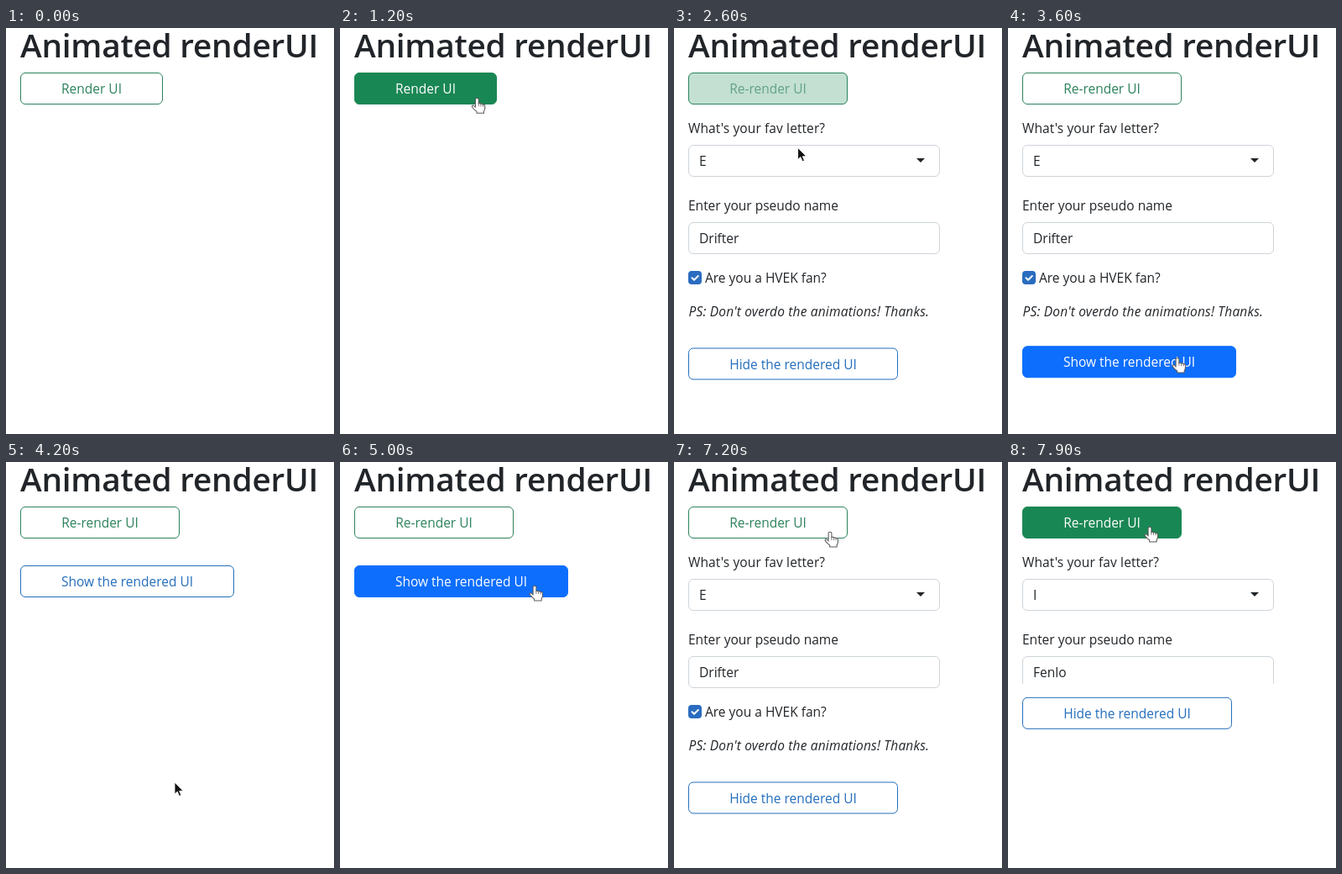
These frames come from a looping animation (391x483 px, 8000 ms). An HTML page:

```html
<!DOCTYPE html>
<html lang="en">
<head>
<meta charset="utf-8">
<title>Animated form</title>
<style>
  html, body { margin: 0; width: 100%; height: 100%; overflow: hidden; background: #fff; }
  svg { display: block; width: 100vw; height: 100vh; }
  text { font: 15.5px "Open Sans", "Noto Sans", sans-serif; fill: #212529; white-space: pre; }
  .title { font-size: 38.8px; font-weight: 600; letter-spacing: -.25px; }
  .label { letter-spacing: .11px; }
  .note { font-style: italic; letter-spacing: .2px; }
  .button text { text-anchor: middle; }
  .field { fill: #fff; stroke: #ced4da; }
</style>
</head>
<body>
<svg viewBox="0 0 391 483">
  <defs>
    <clipPath id="clip"><rect id="window" y="107" width="391" height="0"/></clipPath>
  </defs>

  <text class="title" x="17" y="35">Animated renderUI</text>

  <g id="render" class="button">
    <rect x="17.5" y="53.5" height="37" rx="5.5"/>
    <text y="78"></text>
  </g>

  <g id="form" clip-path="url(#clip)">
    <text class="label" x="17" y="125">What's your fav letter?</text>
    <rect class="field" x="17.5" y="139.5" width="299" height="37" rx="5.5"/>
    <text id="letter" x="30" y="164"></text>
    <path d="M289 155h10l-5 5z" fill="#212529"/>

    <text x="17" y="217">Enter your pseudo name</text>
    <rect class="field" x="17.5" y="231.5" width="299" height="37" rx="5.5"/>
    <text id="name" x="30" y="256"></text>

    <rect x="17" y="289" width="16" height="16" rx="4" fill="#2a6cbf"/>
    <path d="M21.5 297.3l2.5 2.5 4.8-4.8" fill="none" stroke="#fff" stroke-width="2"
      stroke-linecap="round" stroke-linejoin="round"/>
    <text x="37" y="303">Are you a HVEK fan?</text>
    <text class="note" x="17.5" y="343">PS: Don't overdo the animations! Thanks.</text>
  </g>

  <g id="toggle" class="button">
    <rect x="17.5" y=".5" height="37" rx="5.5"/>
    <text y="25"></text>
  </g>

  <g id="cursor">
    <path id="arrow" d="M0 0V14.2L3.3 11.2 5.5 16.4 7.9 15.4 5.7 10.4H10.2Z"
      fill="#111" stroke="#fff" stroke-width=".9"/>
    <g id="hand" transform="scale(1.06 1)" stroke="#5a5a5a" stroke-linejoin="round" stroke-linecap="round">
      <path d="M-1.8 11V2a1.8 1.8 0 0 1 3.6 0V6.5q1.3-.9 2.5.5 1.3-.7 2.4.6 2.2-.3 2.2 2V12
        q0 2-1.2 3.6V18H-.3V16Q-2.6 14.4-5 11.4-6.4 9.2-4.6 8.7-3.4 8.6-1.8 11Z" fill="#fff"/>
      <path d="M1.8 6.5V9.5M4.3 7V9.7M6.7 7.6V10" fill="none" stroke-width=".8"/>
    </g>
  </g>
</svg>

<script>
const LOOP = 8000, STEP = 100;
const FULL = 257.5, SLIDE = 600, FADE = 150;
const FORM_TOP = 107, GAP = 16;

const RENDERED = 1600, HIDE_CLICK = 3100, SHOW_CLICK = 5400, RERENDERED = 7558;
const slides = [
  { at: 1697, open: true },
  { at: 3564, open: false },
  { at: 5330, open: true },
  { at: RERENDERED, open: true }
];

// time, x, y of the pointer's hot spot
const path = [
  [300, 357, 443], [700, 262, 236], [1100, 180, 87], [1400, 130, 76],
  [2400, 130, 76], [2500, 134, 84], [2750, 168, 230], [3000, 201, 388], [3100, 202, 392],
  [3800, 202, 392], [4000, 201, 381], [4200, 201, 381], [4400, 215, 343],
  [4850, 229, 156], [5000, 232, 147], [6000, 232, 147], [6350, 225, 392],
  [6600, 225, 392], [6900, 247, 149], [7200, 186, 83], [7300, 169, 77]
];
const greenHover = [[1040, 2500], [7200, 8200]];
const blueHover = [[2900, 3800], [4850, 5400], [6330, 6650]];
const handTimes = [[1040, 2520], [2900, 3900], [4850, 6050], [6330, 6680], [6880, LOOP]];

const GREEN_LINE = [45, 130, 92], GREEN = [25, 135, 84];
const BLUE_LINE = [36, 110, 188], BLUE = [13, 110, 253];
const WHITE = [255, 255, 255];

const $ = id => document.getElementById(id);
const clamp = v => Math.min(1, Math.max(0, v));
const smooth = v => v * v * (3 - 2 * v);
const swing = v => .5 - Math.cos(v * Math.PI) / 2;
const mix = (a, b, k) => `rgb(${a.map((v, i) => Math.round(v + (b[i] - v) * k))})`;
const show = (el, on) => el.setAttribute("visibility", on ? "inherit" : "hidden");
const within = (spans, t) => spans.some(([a, b]) => t >= a && t < b);

function hoverAmount(spans, t) {
  return Math.max(...spans.map(([a, b]) =>
    smooth(clamp((t - a) / FADE)) * (1 - smooth(clamp((t - b) / FADE)))));
}

function formHeight(t) {
  const slide = slides.filter(s => s.at <= t).pop();
  if (!slide) return 0;
  const k = swing(clamp((t - slide.at) / SLIDE));
  return FULL * (slide.open ? k : 1 - k);
}

function pointerAt(t) {
  const next = path.findIndex(p => p[0] > t);
  if (next < 0) return path[path.length - 1].slice(1);
  const [t0, x0, y0] = path[Math.max(0, next - 1)];
  const [t1, x1, y1] = path[next];
  const k = clamp((t - t0) / (t1 - t0));
  return [x0 + (x1 - x0) * k, y0 + (y1 - y0) * k];
}

function setButton(el, label, width, line, fill, hover) {
  const [box, text] = el.children;
  box.setAttribute("width", width - 1);
  box.setAttribute("fill", mix(WHITE, fill, hover));
  box.setAttribute("stroke", mix(line, fill, hover));
  text.setAttribute("x", 17 + width / 2);
  text.style.fill = mix(line, WHITE, hover);
  text.textContent = label;
}

function draw(t) {
  const again = t >= RENDERED;
  setButton($("render"), again ? "Re-render UI" : "Render UI", again ? 190 : 170,
    GREEN_LINE, GREEN, hoverAmount(greenHover, t));

  const height = formHeight(t);
  $("window").setAttribute("height", height);
  show($("form"), height > 0);
  const fresh = t >= RERENDERED;
  $("letter").textContent = fresh ? "I" : "E";
  $("name").textContent = fresh ? "Fenlo" : "Drifter";

  const folded = t >= HIDE_CLICK && t < SHOW_CLICK;
  const toggle = $("toggle");
  setButton(toggle, `${folded ? "Show" : "Hide"} the rendered UI`, folded ? 255 : 250,
    BLUE_LINE, BLUE, hoverAmount(blueHover, t));
  toggle.setAttribute("transform", `translate(0 ${FORM_TOP + height + GAP})`);
  show(toggle, t >= slides[0].at);

  const hand = within(handTimes, t);
  $("cursor").setAttribute("transform", `translate(${pointerAt(t)})`);
  show($("cursor"), t >= path[0][0]);
  show($("hand"), hand);
  show($("arrow"), !hand);
}

const start = performance.now();
function tick() {
  const t = (performance.now() - start) % LOOP;
  draw(Math.floor(t / STEP) * STEP);
  requestAnimationFrame(tick);
}
tick();
</script>
</body>
</html>
```
